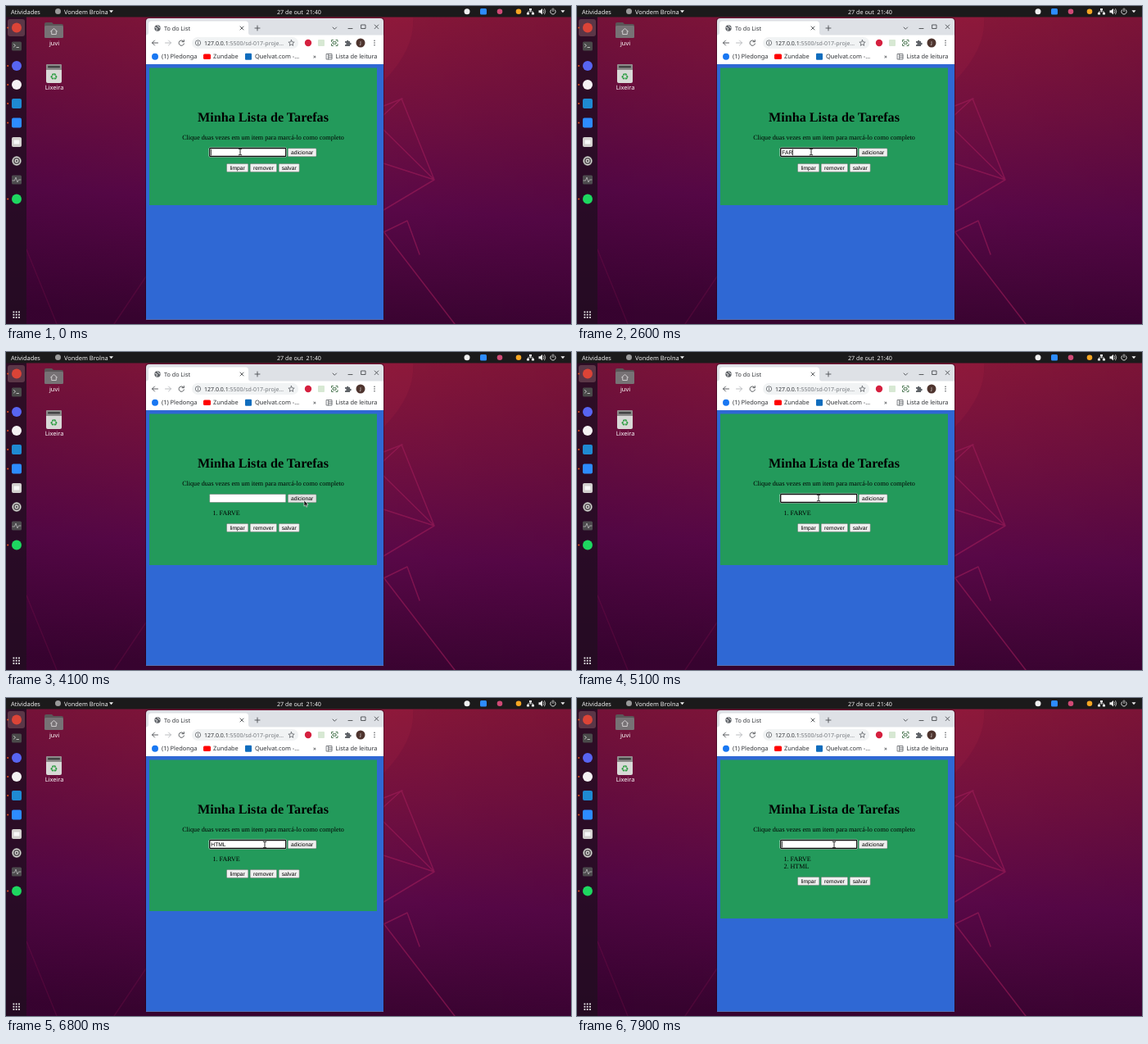
Write an HTML page that moves like this. It is 690 px wide and 388 px high and loops after 8000 ms.

```html
<!DOCTYPE html>
<html lang="pt-BR">
<head>
<meta charset="utf-8">
<title>Lista de tarefas</title>
<style>
html, body { margin: 0; width: 100%; height: 100%; overflow: hidden; background: #420638; }
svg { display: block; width: 690px; height: 388px; text-rendering: geometricPrecision; }
text { white-space: pre; }
.ui { font: 7.4px "Noto Sans", "Open Sans", sans-serif; }
.serif { font: 8.08px "Liberation Serif", "Noto Serif", serif; }
.form { font: 6.73px "Liberation Sans", Roboto, sans-serif; }
.mid { text-anchor: middle; }
.line { fill: none; stroke-linecap: round; stroke-linejoin: round; }
</style>
</head>
<body>
<svg viewBox="0 0 690 388">
  <defs>
    <linearGradient id="sky" x1=".55" y1="0" x2=".45" y2="1">
      <stop offset="0" stop-color="#8b1838"/>
      <stop offset=".3" stop-color="#75113f"/>
      <stop offset=".62" stop-color="#5a0848"/>
      <stop offset="1" stop-color="#38032f"/>
    </linearGradient>
    <linearGradient id="shade">
      <stop offset="0" stop-color="#300030" stop-opacity=".2"/>
      <stop offset=".6" stop-color="#300030" stop-opacity="0"/>
      <stop offset="1" stop-color="#300030" stop-opacity=".18"/>
    </linearGradient>
  </defs>

  <!-- Wallpaper -->
  <rect width="690" height="388" fill="url(#sky)"/>
  <rect width="690" height="388" fill="url(#shade)"/>
  <path d="M461 14H497Q500 52 461 92Z" fill="#b42a48" opacity=".16"/>
  <g class="line" stroke="#a51f5c" stroke-width="1.5" opacity=".55">
    <path d="M461 133L483 113L523 212L461 249M461 151L523 212M461 192L523 212"/>
    <path d="M461 276L490 262L505 303M461 275L548 388M484 113L461 122"/>
    <path d="M25 297L62 388M132 388L171 330" opacity=".35"/>
  </g>

  <!-- Desktop icons -->
  <path d="M47 22q0-2 2-2h7l2 2h10q2 0 2 2v13q0 2-2 2H49q-2 0-2-2Z" fill="#5b5658"/>
  <rect x="47" y="24" width="23" height="15" rx="1.6" fill="#777275"/>
  <path d="M54.5 31L58.5 27.5L62.500 31M55.700 30.500V34.500H61.300V30.500" class="line" stroke="#d8d5d6" stroke-width=".9"/>
  <text x="59" y="48" class="ui mid" fill="#fff">juvi</text>
  <rect x="49" y="71" width="19" height="23" rx="2" fill="#d9d9d7"/>
  <path d="M49 78V73q0-2 2-2H66q2 0 2 2V78Z" fill="#8d8b8a"/>
  <rect x="51" y="73" width="15" height="2.500" rx="1" fill="#444"/>
  <text x="58.500" y="90" class="mid" font-size="11" font-family="DejaVu Sans, sans-serif" fill="#2f9e44">♻</text>
  <text x="59" y="101.500" class="ui mid" fill="#fff">Lixeira</text>

  <!-- Dock -->
  <rect y="13" width="25" height="375" fill="#240d22" opacity=".86"/>
  <rect x="2" y="16" width="21" height="21" rx="3" fill="#6b4653" opacity=".75"/>
  <g id="dock"></g>
  <g transform="translate(13 49)">
    <rect x="-6" y="-5.500" width="12" height="11" rx="1.500" fill="#4a4a4a"/>
    <path d="M-3.500 -2.500L-1.500 -.8L-3.500 1M0 1.500H2.500" class="line" stroke="#ddd" stroke-width=".8"/>
  </g>
  <g transform="translate(13 166)">
    <rect x="-6" y="-6" width="12" height="12" rx="2" fill="#d2d0ce"/>
    <rect x="-3.500" y="-2.500" width="7" height="5" fill="#f7f7f7"/>
  </g>
  <g transform="translate(13 189)" fill="none" stroke="#d6d4d2">
    <circle r="6" fill="#5a5759" stroke="none"/>
    <circle r="4.700" stroke-width="1.400"/><circle r="1.800" stroke-width="1.200"/>
  </g>
  <g transform="translate(13 212)">
    <rect x="-6" y="-5.500" width="12" height="11" rx="1.500" fill="#4d4b4e"/>
    <path d="M-5 1H-2.500L-1 -3L1 3L2.500 0H5" class="line" stroke="#b8b8b8" stroke-width=".8"/>
  </g>

  <!-- Top bar -->
  <rect width="690" height="13.500" fill="#1b1a1b"/>
  <g class="ui" fill="#f0f0f0">
    <text x="6" y="9.500">Atividades</text>
    <circle cx="63.500" cy="6.500" r="3.500" fill="#9a9a9a"/>
    <text x="71" y="9.500">Vondem Brolna</text>
    <path d="M126 5.200H131L128.500 8.200Z"/>
    <text x="331" y="9.500" font-size="7.2">27 de out  21:40</text>
    <circle cx="563" cy="6.700" r="3.500"/>
    <rect x="579" y="3" width="8" height="7.500" rx="1.500" fill="#2d8cff"/>
    <circle cx="603" cy="6.700" r="3.300" fill="#d04a76"/>
    <circle cx="626" cy="6.700" r="3.300" fill="#f5a623"/>
    <path d="M639 3h3v2.500h-3zM636 8h3v2.500h-3zM642 8h3v2.500h-3z"/>
    <path d="M640.500 5V7M637.500 8V6.800H643.500V8" class="line" stroke="#eee" stroke-width=".7"/>
    <path d="M650.500 5.300H652.500L655 3V10.500L652.500 8.200H650.500Z"/>
    <path d="M656.300 4.800Q657.800 6.700 656.300 8.700M657.700 3.500Q660 6.700 657.700 10" class="line" stroke="#eee" stroke-width=".7"/>
    <path d="M666.200 4.200A3.200 3.200 0 1 0 669.800 4.200M668 3V6.500" class="line" stroke="#eee" stroke-width=".9"/>
    <path d="M677.500 5.200H682.500L680 8.200Z"/>
  </g>

  <!-- Browser window -->
  <rect x="170" y="14.500" width="292" height="369" rx="4" fill="#16000f" opacity=".4"/>
  <path d="M171 382.500V19q0-4 4-4H457q4 0 4 4V382.500Z" fill="#dee1e6"/>
  <path d="M171 35.500q3 0 3-3V22q0-3.500 3.500-3.500H292.500q3.500 0 3.500 3.500V32.500q0 3 3 3H461V71H171Z" fill="#fff"/>
  <g class="line" stroke="#4a4d51" stroke-width=".9">
    <path d="M286 25L290 29M290 25L286 29M304 27H310M307 24V30"/>
    <path d="M399 26L401.300 28.300L403.600 26M418 27.500H423M434 23H439V27.500H434ZM450.200 23L454.800 27.600M454.800 23L450.200 27.600"/>
    <path d="M185.500 45H178.500M181.500 42L178.500 45L181.500 48"/>
    <path d="M194.500 45H201.500M198.500 42L201.500 45L198.500 48" stroke="#b4b6b9"/>
    <path d="M217 43.400A3.200 3.200 0 1 0 217.400 46M217.300 41.500V43.700H215"/>
  </g>
  <circle cx="185" cy="27" r="3.700" fill="#5f6368"/>
  <path d="M182 26L184.500 27L184 29.500M185 23.800L186.500 26L188 26.500" class="line" stroke="#fff" stroke-width=".8"/>
  <rect x="227" y="38" width="130" height="14" rx="7" fill="#f1f3f4"/>
  <circle cx="234.500" cy="45" r="3.200" fill="none" stroke="#5f6368" stroke-width=".8"/>
  <path d="M234.500 44.600V46.700M234.500 43.300V43.400" class="line" stroke="#5f6368" stroke-width=".8"/>
  <path d="M348.500 41.500L349.500 43.900L352.100 44.100L350.100 45.800L350.700 48.300L348.500 46.900L346.300 48.300L346.900 45.800L344.900 44.100L347.500 43.900Z" class="line" stroke="#5f6368" stroke-width=".8"/>
  <circle cx="369" cy="45" r="4.200" fill="#d5203f"/>
  <rect x="381" y="41" width="8" height="8" rx="1" fill="#d7e8d3"/>
  <path d="M397.500 43.500V41.500H399.500M403 41.500H405V43.500M405 46.500V48.500H403M399.500 48.500H397.500V46.500M399.500 43.700H403V46.300H399.500Z" class="line" stroke="#3d6b45" stroke-width=".9"/>
  <path d="M414 43H416a1.200 1.200 0 1 1 2.400 0H420V45a1.200 1.200 0 1 1 0 2.200V49H414V47a1.100 1.100 0 1 0 0-2Z" fill="#5f6368"/>
  <circle cx="433" cy="45" r="5.500" fill="#4e342e"/>
  <g fill="#55585c"><circle cx="450" cy="42.300" r=".8"/><circle cx="450" cy="45" r=".8"/><circle cx="450" cy="47.700" r=".8"/></g>
  <circle cx="182" cy="61.700" r="4" fill="#1877f2"/>
  <rect x="241" y="58.500" width="9" height="6.500" rx="1.500" fill="#f00"/>
  <rect x="292" y="57.700" width="8" height="8" rx="1" fill="#0f6cbd"/>
  <path d="M391.500 58.500H398V65H391.500ZM393.700 58.500V65M394 60.700H398M394 62.800H398" class="line" stroke="#5f6368" stroke-width=".8"/>
  <g class="ui" fill="#303337">
    <text x="193" y="29.600" font-size="7.2">To do List</text>
    <text x="242" y="47.600" style="font-size:7px">127.0.0.1<tspan fill="#74787d">:5500/sd-017-proje…</tspan></text>
    <text x="433" y="47" class="mid" style="font-size:5.500px" fill="#fff">J</text>
    <text x="190" y="64.300">(1) Pledonga</text>
    <text x="253" y="64.300">Zundabe</text>
    <text x="304" y="64.300">Quelvat.com -…</text>
    <text x="375" y="64">»</text>
    <text x="402.500" y="64.300">Lista de leitura</text>
  </g>

  <!-- Page -->
  <rect x="171" y="71" width="290" height="311.500" fill="#2f68d4"/>
  <rect id="panel" x="175" y="75.500" width="278" height="167.500" fill="#239a5b"/>
  <text x="314" y="141" class="serif mid" style="font-size:16.16px;font-weight:bold">Minha Lista de Tarefas</text>
  <text x="314" y="163" class="serif mid">Clique duas vezes em um item para marcá-lo como completo</text>
  <rect id="halo" x="247.600" y="172.500" width="95.200" height="12" rx="1.800" fill="#fff"/>
  <rect id="field" x="248.700" y="173.500" width="93" height="10" rx=".8" fill="#fff"/>
  <text id="typed" x="250.300" y="181" class="form"></text>
  <rect id="caret" y="174.800" width=".7" height="7.600"/>
  <g id="items" class="serif"></g>
  <g id="add"></g>
  <g id="actions"></g>

  <g id="pointer">
    <path id="beam" d="M-1.700 -3.800Q0 -3.800 0 -3Q0 -3.800 1.700 -3.800M0 -3V3M-1.700 3.800Q0 3.800 0 3Q0 3.800 1.700 3.800" class="line" stroke="#111" stroke-width=".9"/>
    <path id="arrow" d="M0 0V7.200L1.700 5.700L2.800 8.200L4.100 7.600L3 5.200H5.200Z" fill="#111" stroke="#fff" stroke-width=".6"/>
  </g>
</svg>
<script>
const LOOP = 8000, TICK = 100, BLINK = 550;
const $ = id => document.getElementById(id);
const TASKS = ['FARVE', 'HTML'];

// time, typed text, field focused, tasks listed
const STEPS = [
  [0, '', true, 0],
  [1900, 'F', true, 0], [2200, 'FA', true, 0], [2600, 'FAR', true, 0],
  [2800, 'FARV', true, 0], [3000, 'FARVE', true, 0],
  [3900, '', false, 1], [4500, '', true, 1],
  [5600, 'H', true, 1], [5800, 'HT', true, 1], [6000, 'HTM', true, 1], [6100, 'HTML', true, 1],
  [7500, '', false, 2], [7800, '', true, 2]
];

// time, x, y
const PATH = [
  [0, 286, 178], [3200, 286, 178], [3700, 364, 181], [4100, 364, 181],
  [4300, 328, 169], [4500, 295, 178], [6600, 295, 178], [6800, 316, 179],
  [7200, 364, 180], [7500, 364, 180], [7800, 314, 179], [LOOP, 314, 179]
];

// Extra height of the page for 0, 1 and 2 tasks
const GROWTH = [0, 17, 26];

const button = (label, x, y, width) =>
  `<rect x="${x}" y="${y}" width="${width}" height="10" rx="1" fill="#efefef" stroke="#6d6d6d" stroke-width=".5"/>
   <text x="${x + width / 2}" y="${y + 7.3}" class="form mid">${label}</text>`;

$('add').innerHTML = button('adicionar', 344.3, 173.7, 34.7);
$('actions').innerHTML = button('limpar', 269.5, 192.4, 26.3)
  + button('remover', 298.2, 192.4, 32.4) + button('salvar', 333.2, 192.4, 25);
$('items').innerHTML = TASKS.map((task, i) =>
  `<g><text x="252.500" y="${199 + 9 * i}">${i + 1}.</text><text x="260.500" y="${199 + 9 * i}">${task}</text></g>`).join('');

const app = (y, color, round = true) =>
  `<rect x="7" y="${y - 6}" width="12" height="12" rx="${round ? 6 : 2}" fill="${color}"/>
   <circle cx="2.200" cy="${y}" r="1" fill="#e95420"/>`;
$('dock').innerHTML = app(26.5, '#db4437') + app(73, '#5865f2') + app(96, '#f4f1f3')
  + app(119, '#1f8ad2', false) + app(142.5, '#2d8cff', false) + app(235.5, '#1ed760');
for (let i = 0; i < 9; i++) {
  $('dock').innerHTML += `<rect x="${8.5 + i % 3 * 3.3}" y="${372.5 + Math.floor(i / 3) * 3.3}" width="1.800" height="1.800" fill="#eee"/>`;
}

function pointAt(t) {
  const i = PATH.findIndex(key => key[0] > t);
  const [t0, x0, y0] = PATH[i - 1], [t1, x1, y1] = PATH[i];
  const k = (t - t0) / (t1 - t0);
  return [x0 + (x1 - x0) * k, y0 + (y1 - y0) * k];
}

const show = (node, on) => { node.style.display = on ? '' : 'none'; };

function draw(t) {
  const [since, text, focused, count] = STEPS.filter(step => step[0] <= t).pop();
  const [x, y] = pointAt(t);
  const inRow = y > 173 && y < 185;

  $('typed').textContent = text;
  $('caret').setAttribute('x', 250.2 + (text ? $('typed').getComputedTextLength() : 0));
  show($('caret'), focused && Math.floor((t - since) / BLINK) % 2 === 0);
  show($('halo'), focused);
  $('field').setAttribute('stroke', focused ? '#101010' : '#6d6d6d');
  $('field').setAttribute('stroke-width', focused ? 1.3 : 0.5);

  $('panel').setAttribute('height', 167.5 + GROWTH[count]);
  $('actions').setAttribute('transform', `translate(0 ${GROWTH[count]})`);
  [...$('items').children].forEach((item, i) => show(item, i < count));

  const overAdd = inRow && x > 344 && x < 379;
  $('add').firstElementChild.setAttribute('fill', overAdd ? '#e2e2e2' : '#efefef');
  const overField = inRow && x > 248 && x < 342;
  show($('beam'), overField);
  show($('arrow'), !overField);
  $('pointer').setAttribute('transform', `translate(${x} ${y})`);
}

function frame() {
  draw(Math.floor(performance.now() % LOOP / TICK) * TICK);
  requestAnimationFrame(frame);
}
frame();
</script>
</body>
</html>
```
